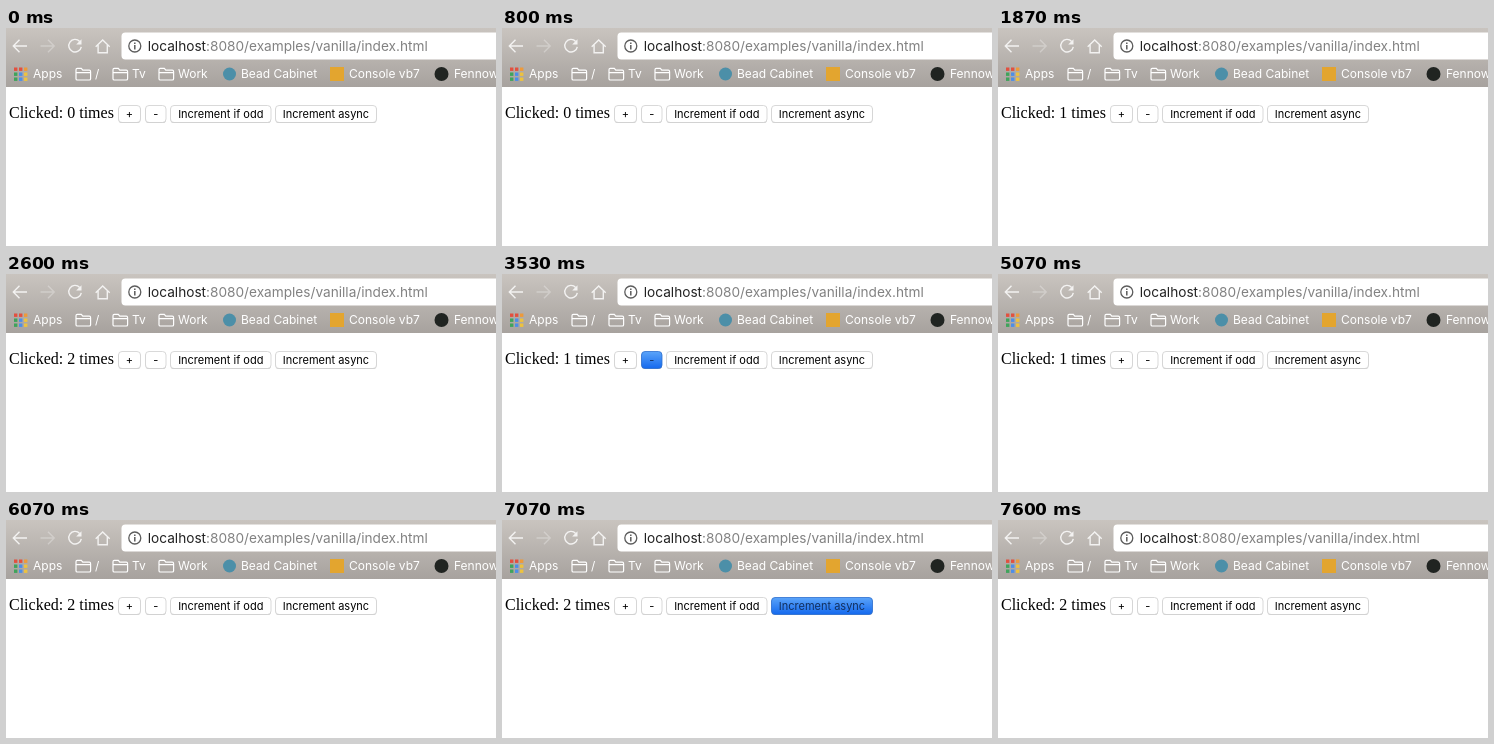
Write an HTML page that moves like this. It is 490 by 218 pixels and loops after 8 s.

```html
<!DOCTYPE html>
<html lang="en">
<head>
<meta charset="utf-8">
<title>Counter</title>
<style>
  html, body { margin: 0; width: 100%; height: 100%; overflow: hidden; background: #fff; }
  svg { display: block; width: 490px; height: 218px; }
  .ui { font: 12px Inter, Roboto, sans-serif; fill: #fff; }
  .url { font: 13.65px Inter, Roboto, sans-serif; fill: #828282; }
  .host { fill: #222; }
  .page { font: 16px "Liberation Serif", Times, serif; fill: #000; }
  .label { font: 11px Inter, Roboto, sans-serif; text-anchor: middle; }
  .line { fill: none; stroke: #fff; stroke-width: 1.4; }
</style>
</head>
<body>
<svg viewBox="0 0 490 218">
  <defs>
    <linearGradient id="bar" x2="0" y2="1">
      <stop stop-color="#c9c4bf"/><stop offset="1" stop-color="#a7a29e"/>
    </linearGradient>
    <linearGradient id="pressed" x2="0" y2="1">
      <stop stop-color="#5ba4f9"/><stop offset="1" stop-color="#1469ee"/>
    </linearGradient>
    <path id="folder" class="line" style="stroke-width:1.2"
      d="M.7 11V2Q.7.7 2 .7H6L7.5 2.5H14Q15.3 2.5 15.3 4V11Q15.3 12.3 14 12.3H2Q.7 12.3.7 11ZM.7 5H15.3"/>
    <path id="arrow" class="line" d="M15 7H1.5M7.5.8L1.3 7L7.5 13.2"/>
  </defs>

  <rect width="490" height="59" fill="url(#bar)"/>

  <g opacity=".82">
    <use href="#arrow" x="6" y="11"/>
    <use href="#arrow" transform="translate(49.5 11) scale(-1 1)" opacity=".35"/>
    <path class="line" d="M73.7 13.4A6.3 6.3 0 1 0 75.3 18.8"/>
    <path d="M75.5 11.3V16.6H70.2Z" fill="#fff"/>
    <path class="line" d="M89.7 18.7L96.7 12L103.7 18.7M92.1 17V24.7H101.3V17"/>
  </g>

  <rect x="115.5" y="4.4" width="390" height="27.1" rx="4" fill="#fff"/>
  <circle cx="128.8" cy="18" r="6" fill="none" stroke="#5c5c5c" stroke-width="1.3"/>
  <path d="M128.8 14.4V16M128.8 17.1V21.6" stroke="#5c5c5c" stroke-width="1.5"/>
  <text class="url" x="141.8" y="23"><tspan class="host">localhost</tspan>:8080/examples/vanilla/index.html</text>

  <g id="apps"></g>
  <use href="#folder" x="69.3" y="39.7"/>
  <use href="#folder" x="106.3" y="39.7"/>
  <use href="#folder" x="152.3" y="39.7"/>
  <circle cx="223.5" cy="46" r="6.5" fill="#4c8fa8"/>
  <rect x="324" y="39" width="14" height="14" fill="#e3a52f"/>
  <circle cx="435.5" cy="46" r="7" fill="#202421"/>
  <g class="ui">
    <text x="27" y="50.3">Apps</text>
    <text x="89" y="50.3">/</text>
    <text x="126" y="50.3">Tv</text>
    <text x="172" y="50.3">Work</text>
    <text x="235" y="50.3">Bead Cabinet</text>
    <text x="343" y="50.3">Console vb7</text>
    <text x="448" y="50.3">Fennowick</text>
  </g>

  <text id="counter" class="page" x="3" y="90"></text>
  <g id="buttons"></g>
</svg>
<script>
const LOOP = 8000;
const NS = "http://www.w3.org/2000/svg";
const byId = id => document.getElementById(id);

function add(parent, tag, attrs, text = "") {
  const node = document.createElementNS(NS, tag);
  for (const key in attrs) node.setAttribute(key, attrs[key]);
  node.textContent = text;
  parent.append(node);
  return node;
}

const appColors = ["#e2503f", "#e2503f", "#ee9a3a", "#3fa45b", "#4d8ee8", "#edc23f", "#3fa45b", "#4d8ee8", "#edc23f"];
appColors.forEach((fill, i) => add(byId("apps"), "rect", {
  x: 8 + 5 * (i % 3), y: 39.5 + 5 * Math.floor(i / 3), width: 3.4, height: 3.4, fill
}));

const buttons = [
  ["+", 112.5, 22], ["-", 139.5, 20.5], ["Increment if odd", 164.5, 100.5], ["Increment async", 269.5, 101]
].map(([label, x, width]) => {
  const box = { x, y: 77.5, width, height: 17, rx: 3.5 };
  add(byId("buttons"), "rect", { ...box, y: 78.1, fill: "#bcbcbc" });
  const face = add(byId("buttons"), "rect", { ...box, "stroke-width": .8 });
  const text = add(byId("buttons"), "text", { class: "label", x: x + width / 2, y: 90 }, label);
  return { face, text };
});

// The async click takes effect only after the loop has ended.
const clicks = [
  { button: 0, down: 1530, up: 1670, step: 1 },
  { button: 0, down: 2130, up: 2270, step: 1 },
  { button: 1, down: 3000, up: 3130, step: -1 },
  { button: 1, down: 3530, up: 3670, step: -1 },
  { button: 0, down: 4400, up: 4530, step: 1 },
  { button: 2, down: 5870, up: 6000, step: 1 },
  { button: 3, down: 7000, up: 7200, step: 0 }
];

function render(time) {
  const count = clicks.reduce((sum, c) => sum + (time >= c.up ? c.step : 0), 0);
  const held = clicks.find(c => time >= c.down && time < c.up);
  byId("counter").textContent = `Clicked: ${count} times`;
  buttons.forEach(({ face, text }, i) => {
    const isDown = held?.button === i;
    face.setAttribute("fill", isDown ? "url(#pressed)" : "#fff");
    face.setAttribute("stroke", isDown ? "#2c6fd0" : "#d0d0d0");
    text.setAttribute("fill", isDown ? "#12305f" : "#000");
  });
}

const start = performance.now();
function tick() {
  render((performance.now() - start) % LOOP);
  requestAnimationFrame(tick);
}
tick();
</script>
</body>
</html>
```
